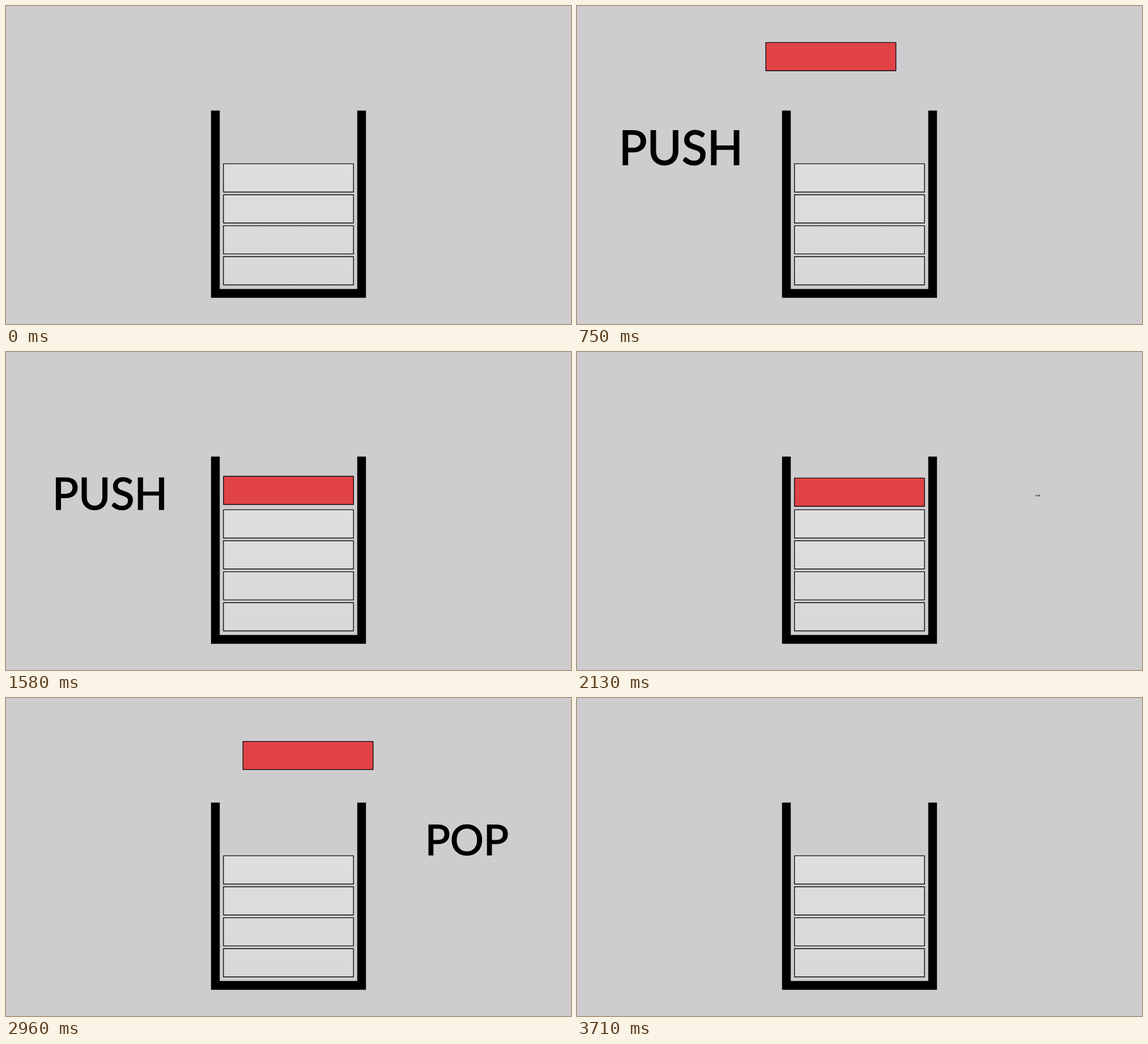
An HTML page that plays this animation: 997 px wide and 561 px high, repeating every 3.79 s.

```html
<!DOCTYPE html>
<html lang="en">
<head>
<meta charset="utf-8">
<title>Stack push and pop</title>
<style>
  html, body { margin: 0; width: 100%; height: 100%; overflow: hidden; background: #cecccf; }
  svg { display: block; width: 100vw; height: 100vh; }
  .item { stroke: #0c0c0e; stroke-width: 1.4; stroke-linejoin: round; }
  text {
    font: 400 83px Lato, sans-serif;
    text-anchor: middle;
    stroke: #000;
    stroke-width: 1.8;
  }
</style>
</head>
<body>
<svg viewBox="0 0 997 561">
  <defs>
    <linearGradient id="pale" gradientUnits="userSpaceOnUse" x1="0" y1="278" x2="0" y2="492">
      <stop offset="0" stop-color="#dfdde0"/>
      <stop offset="1" stop-color="#d9d7da"/>
    </linearGradient>
  </defs>
  <g id="stack" fill="url(#pale)"></g>
  <path d="M369.5 184.5V507H627.5V184.5" fill="none" stroke="#000" stroke-width="15.4"/>
  <rect id="box" class="item" width="229.5" height="49.8" fill="#e04246"/>
  <g id="push"><text y="26">PUSH</text></g>
  <g id="pop"><text y="26">POP</text></g>
</svg>
<script>
const LOOP = 3790, FRAME = 1000 / 24, LAST = 90;
const REST = { x: 383.7, y: 222.4 };
const $ = id => document.getElementById(id);

// Frames away from rest, sideways distance, height.
const PATH = [
  [0, 0, 0], [6, 0.5, 23], [12, 5.5, 76], [17, 18.6, 123], [22, 50.5, 158],
  [25, 85, 171], [28, 153.5, 177], [33, 342, 179], [38, 613, 180], [41, 800, 180]
];

// Frame within a label's life, scale.
const PULSE = [[9.8, 0], [18, 1], [23, 0.89], [36, 0.89], [41, 1], [47.5, 0]];

for (let i = 0; i < 4; i++) {
  const r = document.createElementNS("http://www.w3.org/2000/svg", "rect");
  const attrs = { class: "item", x: REST.x, y: 278.4 + i * 54.6, width: 229.5, height: 49.8 };
  for (const k in attrs) r.setAttribute(k, attrs[k]);
  $("stack").append(r);
}

function slope(i, c) {
  if (i === 0) return 0;
  const a = PATH[i - 1], b = PATH[i], n = PATH[i + 1];
  const left = (b[c] - a[c]) / (b[0] - a[0]);
  if (!n) return left;
  const h1 = b[0] - a[0], h2 = n[0] - b[0];
  return (left * h2 + (n[c] - b[c]) / h2 * h1) / (h1 + h2);
}

function along(d, c) {
  d = Math.max(0, Math.min(d, 41));
  let i = 0;
  while (i < PATH.length - 2 && d > PATH[i + 1][0]) i++;
  const a = PATH[i], b = PATH[i + 1], h = b[0] - a[0], u = (d - a[0]) / h, v = 1 - u;
  return v * v * (1 + 2 * u) * a[c] + u * u * (3 - 2 * u) * b[c]
    + h * u * v * (v * slope(i, c) - u * slope(i + 1, c));
}

// Symmetric ease with handles at 0.39 and 0.61.
function ease(u) {
  let lo = 0, hi = 1, t = 0.5;
  for (let k = 0; k < 20; k++) {
    t = (lo + hi) / 2;
    const x = 1.17 * t * (1 - t) ** 2 + 1.83 * t * t * (1 - t) + t ** 3;
    if (x < u) lo = t; else hi = t;
  }
  return t * t * (3 - 2 * t);
}

function pulse(f) {
  const i = PULSE.findIndex(p => f < p[0]);
  if (i < 1) return 0;
  const [f0, s0] = PULSE[i - 1], [f1, s1] = PULSE[i];
  return s0 + (s1 - s0) * ease((f - f0) / (f1 - f0));
}

function label(id, x, f) {
  const s = pulse(f);
  $(id).setAttribute("visibility", s > 0.015 ? "visible" : "hidden");
  $(id).setAttribute("transform", `translate(${x} 254) scale(${Math.max(s, 0.001)})`);
}

function draw(ms) {
  const f = Math.min(LAST, Math.floor((ms % LOOP + 5) / FRAME));
  const leaving = f > 45;
  const d = leaving ? f - 51 : 40 - f;
  const x = REST.x + (leaving ? 1 : -1) * along(d, 1);
  $("box").setAttribute("transform", `translate(${x} ${REST.y - along(d, 2)})`);
  $("box").setAttribute("visibility", f < 2 || f > 88 ? "hidden" : "visible");
  label("push", 183.5, f);
  label("pop", 813.3, f - 40);
}

const start = performance.now();
function tick() {
  draw(performance.now() - start);
  requestAnimationFrame(tick);
}
tick();
</script>
</body>
</html>
```
